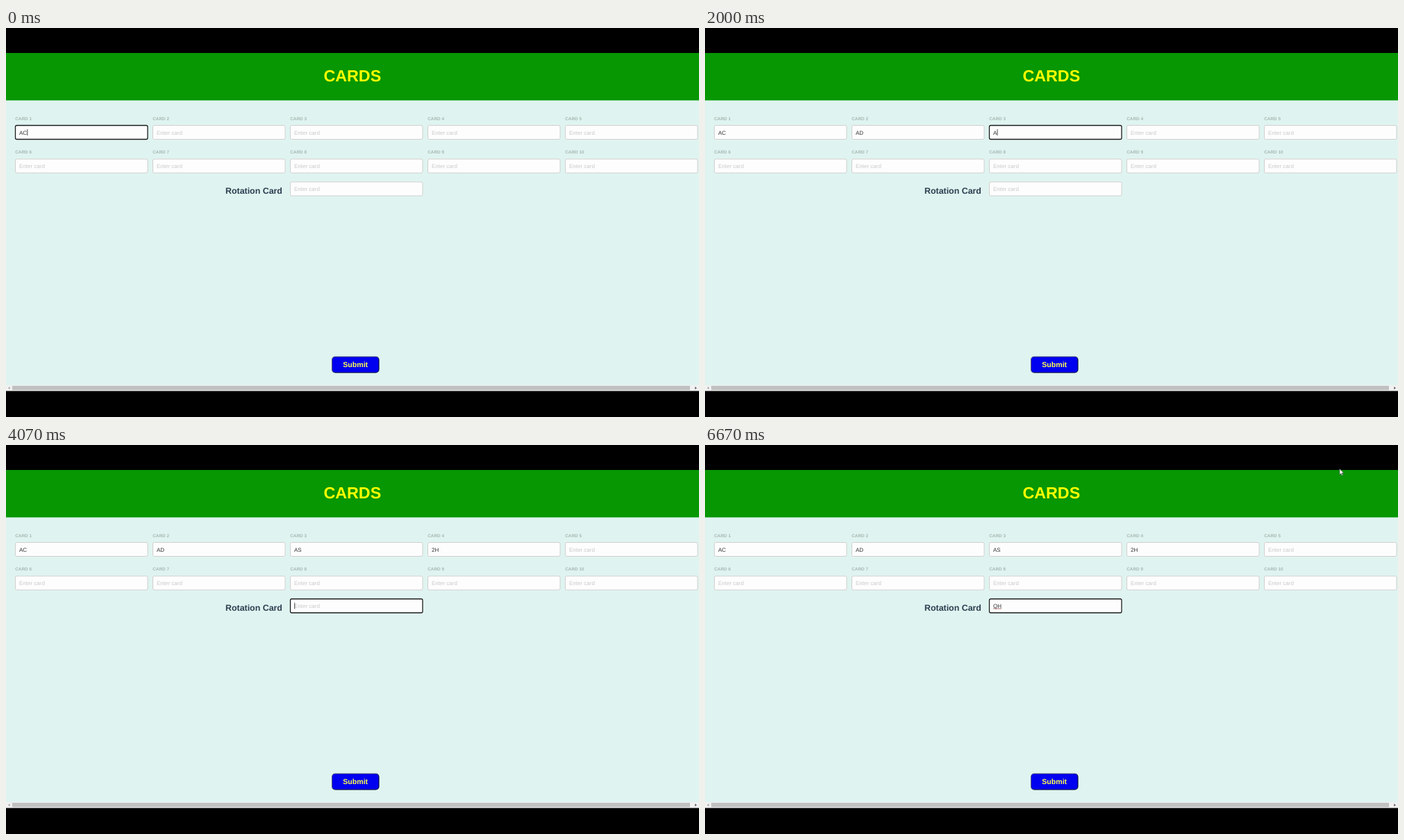
These frames come from a looping animation (998x561 px, 6730 ms). An HTML page:

```html
<!DOCTYPE html>
<html lang="en">
<head>
<meta charset="utf-8">
<title>Cards</title>
<style>
  html, body { margin: 0; width: 100%; height: 100%; overflow: hidden; background: #000; }
  svg { display: block; width: 998px; height: 561px; font-family: "Liberation Sans", Arial, sans-serif; text-rendering: geometricPrecision; }
  .bold { font-weight: bold; }
  .label { font-size: 6.4px; font-weight: bold; fill: #a9b7b2; }
  .value { font-size: 8px; }
</style>
</head>
<body>
<svg id="stage" viewBox="0 0 998 561">
  <defs>
    <linearGradient id="bevel" x2="1" y2="1">
      <stop offset=".45" stop-color="#55557c"/>
      <stop offset=".55" stop-color="#08082c"/>
    </linearGradient>
  </defs>
  <rect width="998" height="561"/>
  <rect y="104" width="998" height="411" fill="#dff4f0"/>
  <rect y="36" width="998" height="68.4" fill="#069702"/>
  <text class="bold" x="498.8" y="77.3" font-size="23.3" text-anchor="middle" fill="#ff0">CARDS</text>
  <text class="bold" x="316" y="239.3" font-size="12.4" fill="#2c3e50">Rotation Card</text>
  <g id="fields"></g>
  <rect x="469.5" y="474" width="67.5" height="23" rx="4.5" fill="#0000f0" stroke="url(#bevel)" stroke-width="1.1"/>
  <text class="bold" x="503.2" y="488.8" font-size="10.6" text-anchor="middle" fill="#ffff50">Submit</text>
  <rect y="515" width="998" height="8.5" fill="#f1f1f1"/>
  <rect x="9" y="516" width="976" height="6.2" fill="#c1c1c1"/>
  <path d="M5.5 517.2v4l-2.5-2z" fill="#a0a0a0"/>
  <path d="M992.3 517.2v4l2.5-2z" fill="#505050"/>
  <path id="squiggle" d="M415 236h12" stroke="#a86868" stroke-width=".9"/>
  <path id="caret" stroke="#222" stroke-width=".8"/>
  <path id="pointer" d="M0 0v8.2l1.9-1.7 1.4 3 1.3-.6-1.4-2.9h2.6z" fill="#fff" stroke="#555" stroke-width=".7"/>
</svg>
<script>
const LOOP = 6730, BLINK = 533, W = 190.5, H = 20;
const NS = "http://www.w3.org/2000/svg";
const byId = id => document.getElementById(id);

// [time, field, text]: focus changes and key presses
const edits = [
  [0, 0, "AC"],
  [480, 1, ""], [920, 1, "A"], [1080, 1, "AD"],
  [1500, 2, ""], [1900, 2, "A"], [2150, 2, "AS"],
  [2600, 3, ""], [2800, 3, "2"], [3660, 3, "2H"],
  [4070, 10, ""], [4930, 10, "Q"], [5070, 10, "QH"]
];

// [time, x, y] of the pointer tip
const path = [
  [0, 120, 152], [150, 120, 152], [460, 250, 152], [1100, 250, 152],
  [1240, 380, 165], [1330, 432.5, 163.5], [1480, 455, 152], [2300, 455, 152],
  [2580, 650, 152], [3330, 650, 152], [3500, 607, 162], [3700, 600, 166],
  [4030, 525, 232], [4930, 525, 232], [5070, 532, 246], [5640, 914, 34.5]
];

function add(parent, name, attrs) {
  const el = document.createElementNS(NS, name);
  for (const key in attrs) el.setAttribute(key, attrs[key]);
  return parent.appendChild(el);
}

const fields = Array.from({ length: 11 }, (_, i) => {
  const x = i < 10 ? 13.5 + 198 * (i % 5) : 409.5;
  const y = i < 5 ? 140.5 : i < 10 ? 189 : 222;
  const group = byId("fields");
  if (i < 10) add(group, "text", { class: "label", x: x - .3, y: y - 7.8 }).textContent = "CARD " + (i + 1);
  const box = add(group, "rect", { x, y, width: W, height: H, rx: 2, fill: "#fdfdfd" });
  const text = add(group, "text", { class: "value", x: x + 5.5, y: y + 13 });
  return { x, y, box, text };
});

function pointerAt(t) {
  const i = path.findIndex(p => p[0] > t);
  if (i < 0) return path[path.length - 1].slice(1);
  const [t0, x0, y0] = path[i - 1], [t1, x1, y1] = path[i];
  const k = (t - t0) / (t1 - t0);
  return [x0 + (x1 - x0) * k, y0 + (y1 - y0) * k];
}

const show = (el, on) => el.setAttribute("visibility", on ? "visible" : "hidden");

function draw(t) {
  const done = edits.filter(e => e[0] <= t);
  const [since, active] = done[done.length - 1];
  const values = {};
  for (const [, i, text] of done) values[i] = text;

  fields.forEach((f, i) => {
    const focused = i === active;
    f.box.setAttribute("stroke", focused ? "#1c1c1c" : "#d2cfce");
    f.box.setAttribute("stroke-width", focused ? 1.3 : 1);
    f.text.textContent = values[i] || "Enter card";
    f.text.setAttribute("fill", values[i] ? "#333" : "#c9c9c9");
  });

  const f = fields[active];
  const width = values[active] ? f.text.getComputedTextLength() : 0;
  byId("caret").setAttribute("d", `M${f.x + 6.2 + width} ${f.y + 5.5}v9`);
  show(byId("caret"), Math.floor((t - since) / BLINK) % 2 === 0);
  show(byId("squiggle"), t >= 5600);

  // Over a field the arrow is not shown
  const [x, y] = pointerAt(t);
  byId("pointer").setAttribute("transform", `translate(${x} ${y})`);
  show(byId("pointer"), !fields.some(b => x >= b.x && x <= b.x + W && y >= b.y && y <= b.y + H));
}

const start = performance.now();
function tick() {
  draw((performance.now() - start) % LOOP);
  requestAnimationFrame(tick);
}
tick();
</script>
</body>
</html>
```
